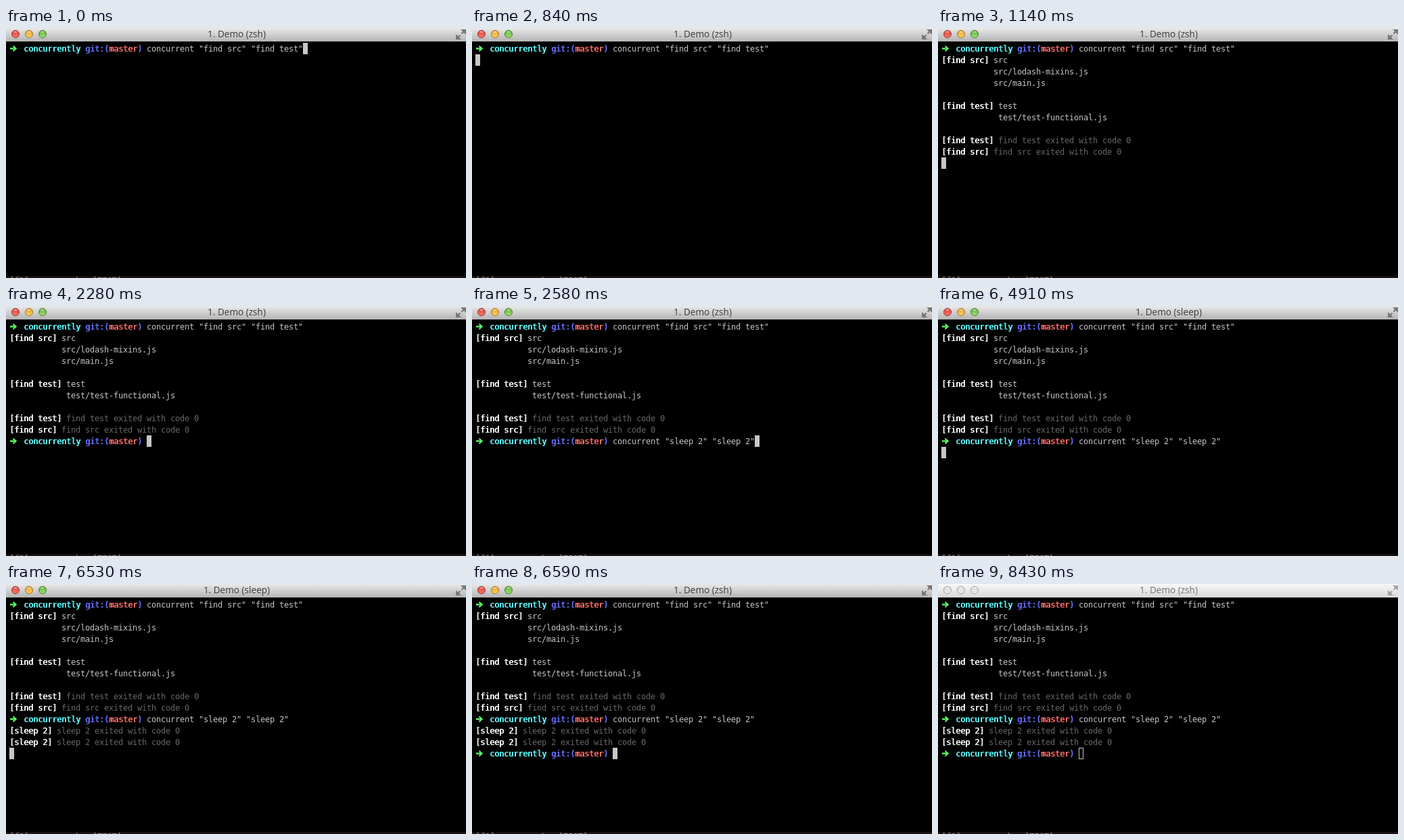
An HTML page with a canvas for the animation above (8520 ms loop, 680 by 371 pixels).

```html
<!DOCTYPE html>
<html lang="en">
<head>
<meta charset="utf-8">
<title>Terminal demo</title>
<style>
  html, body { margin: 0; width: 100%; height: 100%; overflow: hidden; background: #000; }
  canvas { display: block; }
</style>
</head>
<body>
<canvas id="stage" width="680" height="371"></canvas>
<script>
const ctx = document.getElementById('stage').getContext('2d');
const W = 680, H = 371, LOOP = 8520, BAR = 20;
const CELL = 7, LINE = 17, LEFT = 5, TOP = 22;
const MONO = '12px "DejaVu Sans Mono", monospace';
const C = { text: '#c7c7c7', dim: '#686868', white: '#fff', green: '#5ffa68',
            cyan: '#60fdff', blue: '#6871ff', red: '#ff6e67' };

// A line is a list of [column, text, colour, bold] runs.
const prompt = command => [
  [0, '➜', C.green],
  [3, 'concurrently', C.cyan, true],
  [16, 'git:(', C.blue, true],
  [21, 'master', C.red, true],
  [27, ')', C.blue, true],
  [29, command, C.text]
];
const output = (label, text, colour = C.text) => [
  [0, `[${label}]`, C.white, true],
  [label.length + 3, text, colour]
];
const exited = label => output(label, `${label} exited with code 0`, C.dim);

const lines = [
  prompt('concurrent "find src" "find test"'),
  output('find src', 'src'),
  [[11, 'src/lodash-mixins.js', C.text]],
  [[11, 'src/main.js', C.text]],
  [],
  output('find test', 'test'),
  [[12, 'test/test-functional.js', C.text]],
  [],
  exited('find test'),
  exited('find src'),
  prompt('concurrent "sleep 2" "sleep 2"'),
  exited('sleep 2'),
  exited('sleep 2'),
  prompt('')
];

const scenes = [
  { at: 0,    rows: 1,  cursor: [62, 0],  job: 'zsh' },
  { at: 840,  rows: 1,  cursor: [0, 1],   job: 'zsh' },
  { at: 1140, rows: 10, cursor: [0, 10],  job: 'zsh' },
  { at: 1200, rows: 11, cursor: [29, 10], job: 'node', untyped: true },
  { at: 2280, rows: 11, cursor: [29, 10], job: 'zsh', untyped: true },
  { at: 2580, rows: 11, cursor: [59, 10], job: 'zsh' },
  { at: 4320, rows: 11, cursor: [0, 11],  job: 'zsh' },
  { at: 4910, rows: 11, cursor: [0, 11],  job: 'sleep' },
  { at: 6530, rows: 13, cursor: [0, 13],  job: 'sleep' },
  { at: 6590, rows: 14, cursor: [29, 13], job: 'zsh' },
  { at: 8430, rows: 14, cursor: [29, 13], job: 'zsh', inactive: true }
];

function rect(x, y, w, h, fill) {
  ctx.fillStyle = fill;
  ctx.fillRect(x, y, w, h);
}

function polygon(points, fill) {
  ctx.fillStyle = fill;
  ctx.beginPath();
  points.forEach(([x, y]) => ctx.lineTo(x, y));
  ctx.fill();
}

function vertical(y0, y1, ...colours) {
  const g = ctx.createLinearGradient(0, y0, 0, y1);
  colours.forEach((c, i) => g.addColorStop(i / (colours.length - 1), c));
  return g;
}

function drawArrow(y) {
  rect(6, y - 1.2, 5, 2.4, C.green);
  polygon([[10, y - 4.3], [11.5, y - 4.3], [16.3, y], [11.5, y + 4.3], [10, y + 4.3], [11.5, y]], C.green);
}

function drawRun(row, [col, text, colour, bold]) {
  const y = TOP + row * LINE + 13;
  if (text === '➜') return drawArrow(y - 4.5);
  ctx.fillStyle = colour;
  [...text].forEach((ch, i) => {
    const x = LEFT + (col + i) * CELL;
    ctx.fillText(ch, x, y);
    if (bold) ctx.fillText(ch, x + 0.7, y);
  });
}

function drawButton(x, [rim, top, bottom]) {
  const y = 9;
  ctx.beginPath();
  ctx.arc(x, y, 5.5, 0, Math.PI * 2);
  ctx.fillStyle = vertical(y - 6, y + 6, top, bottom);
  ctx.fill();
  ctx.strokeStyle = rim;
  ctx.lineWidth = 1;
  ctx.stroke();
  ctx.beginPath();
  ctx.ellipse(x, y - 3.2, 2.6, 1.4, 0, 0, Math.PI * 2);
  ctx.fillStyle = 'rgba(255,255,255,.45)';
  ctx.fill();
}

function drawExpandIcon(colour) {
  polygon([[672, 2], [680, 2], [680, 10]], colour);
  polygon([[665, 9], [665, 17], [673, 17]], colour);
  ctx.strokeStyle = colour;
  ctx.lineWidth = 2.4;
  ctx.beginPath();
  ctx.moveTo(677, 5);
  ctx.lineTo(673.5, 8.5);
  ctx.moveTo(668, 14);
  ctx.lineTo(671.5, 10.5);
  ctx.stroke();
}

function drawTitleBar({ job, inactive }) {
  rect(0, 0, W, BAR, inactive ? vertical(0, BAR, '#f8f8f8', '#d8d8d8')
                              : vertical(0, BAR, '#e9e9e9', '#b4b4b4'));
  const grey = ['#a3a3a3', '#dadada', '#eeeeee'];
  const lights = [
    ['#96352f', '#dc3f36', '#ff7a6e'],
    ['#a2702a', '#e59c2a', '#ffd868'],
    ['#467d2c', '#55ac35', '#a6e878']
  ];
  lights.forEach((light, i) => drawButton(14 + i * 20, inactive ? grey : light));
  drawExpandIcon(inactive ? '#a4a4a4' : '#777');

  const title = `1. Demo (${job})`;
  ctx.font = '13.5px "Noto Sans", "Open Sans", sans-serif';
  ctx.textAlign = 'center';
  ctx.fillStyle = 'rgba(255,255,255,.5)';
  ctx.fillText(title, 341, 15);
  ctx.fillStyle = inactive ? '#777' : '#3c3c3c';
  ctx.fillText(title, 341, 14);
  ctx.textAlign = 'left';
}

function drawCursor([col, row], hollow) {
  const x = LEFT + col * CELL, y = TOP + row * LINE;
  if (!hollow) return rect(x, y, CELL, LINE, C.text);
  ctx.strokeStyle = C.text;
  ctx.lineWidth = 1;
  ctx.strokeRect(x + 0.5, y + 0.5, CELL - 1, LINE - 1);
}

// The sliver of another window that shows below the terminal.
function drawBottomEdge() {
  rect(0, 368, W, 3, '#1a1010');
  ctx.fillStyle = '#908a88';
  ctx.fillText('[f2] a user: d.. [TEST]', LEFT, 379);
}

function draw(time) {
  const scene = scenes.findLast(s => s.at <= time);
  rect(0, 0, W, H, '#000');
  drawTitleBar(scene);
  ctx.font = MONO;
  lines.slice(0, scene.rows).forEach((runs, row) => {
    const hideCommand = scene.untyped && row === scene.rows - 1;
    (hideCommand ? runs.slice(0, -1) : runs).forEach(run => drawRun(row, run));
  });
  drawCursor(scene.cursor, scene.inactive);
  drawBottomEdge();
}

const start = performance.now();
function tick() {
  draw((performance.now() - start) % LOOP);
  requestAnimationFrame(tick);
}
tick();
</script>
</body>
</html>
```
